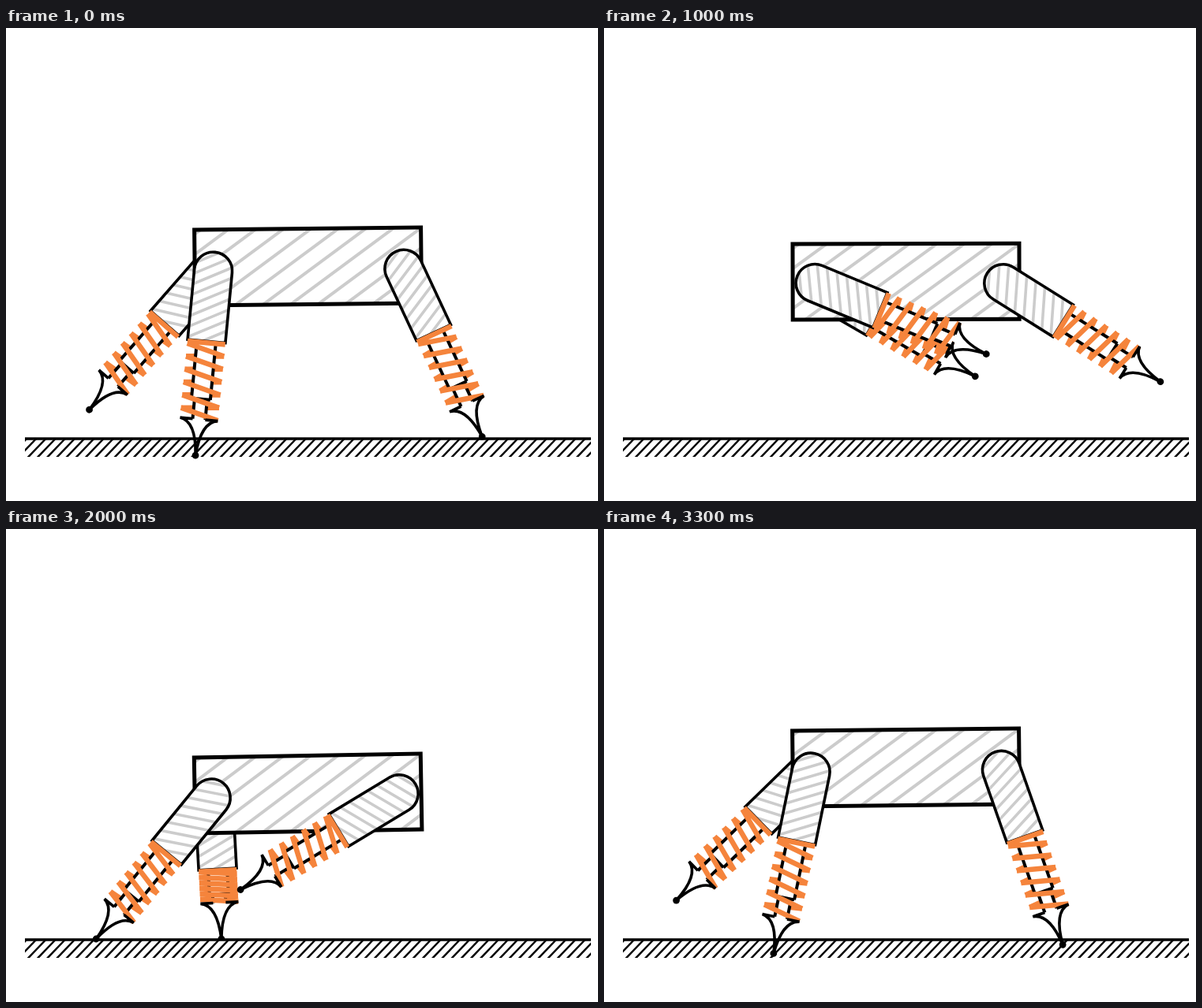
Animation, 750 px wide and 600 px high, one loop 3.35 s. Source, as an HTML page with a canvas:

```html
<!DOCTYPE html>
<html lang="en">
<head>
<meta charset="utf-8">
<title>Running robot with spring legs</title>
<style>
html, body { margin: 0; width: 750px; height: 600px; overflow: hidden; background: #fff; }
canvas { display: block; }
</style>
</head>
<body>
<canvas id="stage" width="750" height="600"></canvas>
<script>
const ctx = document.getElementById('stage').getContext('2d');
const LOOP = 3.35, STEP = 0.05;
const BLACK = '#000', GREY = '#ccc', ORANGE = '#f5843c';
const GROUND = 520, MID_X = 382.6, BODY_W = 287, BODY_H = 96;
const HALF = 24, LEG_END = 94, REACH = 239.5, FOOT = 46;

// Key poses as [seconds, value]; angles in degrees, forward is positive.
const height = [[0, 302.5], [0.6, 309.3], [1.1, 325.5], [1.35, 336.5], [1.66, 343],
  [2, 335.5], [2.2, 327.4], [2.5, 316], [2.75, 309], [2.9, 306.3], [3.3, 302.5]];
const tilt = [[0, 3], [0.6, 1.5], [1.35, 1], [1.66, 3], [2, 5], [2.5, 4], [2.9, 3.5]];
const rear = [[0, -5.5], [0.3, 30], [0.6, 55.9], [1, 67.5], [1.35, 49.9], [1.68, 4],
  [2, -39.2], [2.2, -57.5], [2.5, -66.3], [2.9, -51.5], [3.3, -11.6]];
const farRear = [[0, -41.1], [0.33, -4], [0.6, 28.1], [0.93, 56], [1.35, 67.6], [1.68, 49],
  [2, 3.1], [2.33, -39], [2.5, -55.9], [2.9, -67.4], [3.3, -45.7]];
const front = [[0, 25], [0.3, 53], [0.6, 66.7], [0.8, 67.4], [1.1, 50], [1.35, 22.3],
  [1.68, -24], [2, -58.8], [2.25, -67.3], [2.5, -59.9], [2.9, -27.1], [3.3, 19.3]];

// Smooth periodic curve through the keys.
function curve(keys, time) {
  const t = time % LOOP, n = keys.length;
  const key = i => {
    const turn = Math.floor(i / n), k = keys[i - turn * n];
    return [k[0] + turn * LOOP, k[1]];
  };
  const slope = i => {
    const a = key(i - 1), b = key(i), c = key(i + 1);
    const h1 = b[0] - a[0], h2 = c[0] - b[0];
    return ((b[1] - a[1]) / h1 * h2 + (c[1] - b[1]) / h2 * h1) / (h1 + h2);
  };
  let i = 0;
  while (i < n - 1 && key(i + 1)[0] <= t + 1e-9) i++;
  const a = key(i), b = key(i + 1), h = b[0] - a[0], u = (t - a[0]) / h, v = 1 - u;
  return a[1] * (1 + 2 * u) * v * v + b[1] * (3 - 2 * u) * u * u
    + h * u * v * (slope(i) * v - slope(i + 1) * u);
}

function stroke(color, width) {
  ctx.strokeStyle = color;
  ctx.lineWidth = width;
  ctx.stroke();
}

function lines(color, width, ...segments) {
  ctx.beginPath();
  for (const [x1, y1, x2, y2] of segments) {
    ctx.moveTo(x1, y1);
    ctx.lineTo(x2, y2);
  }
  stroke(color, width);
}

// Hatches the current path, then outlines it.
function hatched(path, hatch, width) {
  ctx.fillStyle = '#fff';
  ctx.fill(path);
  ctx.save();
  ctx.clip(path);
  hatch();
  ctx.restore();
  ctx.strokeStyle = BLACK;
  ctx.lineWidth = width;
  ctx.stroke(path);
}

function drawGround() {
  ctx.fillStyle = '#fff';
  ctx.fillRect(24, 520, 717, 32);
  ctx.save();
  ctx.beginPath();
  ctx.rect(24, 519, 717, 25);
  ctx.clip();
  const marks = [];
  for (let x = 3; x < 750; x += 12.2) marks.push([x, 545, x + 23, 521]);
  lines(BLACK, 2.5, ...marks);
  ctx.restore();
  lines(BLACK, 3.5, [24, 521, 741, 521]);
}

function drawBody(y, drop) {
  ctx.save();
  ctx.translate(MID_X, y);
  ctx.rotate(-drop / BODY_W);
  const box = new Path2D();
  box.rect(-BODY_W / 2, -BODY_H / 2, BODY_W, BODY_H);
  hatched(box, () => {
    const marks = [];
    for (let i = -5; i < 8; i++) {
      const x = -92.6 + i * 35;
      marks.push([x - 14, 58, x + 146, -58]);
    }
    lines(GREY, 4, ...marks);
  }, 5);
  ctx.restore();
}

function drawSpring(len) {
  const s = len - FOOT - LEG_END;
  const at = f => LEG_END + s * f;
  const left = k => at(0.05 + 0.165 * k), right = k => at(0.17 + 0.165 * k);
  const back = [], fore = [[-HALF, LEG_END + 2, HALF, LEG_END + 2]];
  for (let k = 0; k < 6; k++) {
    fore.push([-HALF, left(k), HALF, right(k)]);
    if (k < 5) back.push([HALF, right(k), -HALF, left(k + 1)]);
  }
  const end = at(0.74), cap = at(1);
  lines(ORANGE, 6.5, ...back);
  ctx.fillStyle = '#fff';
  ctx.fillRect(-12, LEG_END, 24, end - LEG_END);
  ctx.fillRect(-8, end, 16, cap - end);
  lines(BLACK, 4, [-12, LEG_END, -12, end], [12, LEG_END, 12, end], [-12, end, 12, end],
    [-8, end, -8, cap], [8, end, 8, cap]);
  lines(ORANGE, 6.5, ...fore);
}

function drawFoot(len) {
  const cap = len - FOOT;
  ctx.beginPath();
  for (const side of [-1, 1]) {
    ctx.moveTo(side * 8, cap);
    ctx.lineTo(side * HALF, cap);
    ctx.quadraticCurveTo(side * 3, cap + 3, 0, len);
  }
  stroke(BLACK, 3.6);
  ctx.beginPath();
  ctx.arc(0, len, 4.4, 0, 7);
  ctx.fillStyle = BLACK;
  ctx.fill();
}

function drawLeg(keys, x, y, t) {
  const deg = curve(keys, t), angle = deg * Math.PI / 180;
  const pushing = curve(keys, t + 0.02) < deg;
  const len = pushing ? Math.min(REACH, (GROUND - y) / Math.cos(angle)) : REACH;
  ctx.save();
  ctx.translate(x, y);
  ctx.rotate(-angle);
  const thigh = new Path2D();
  thigh.moveTo(-HALF, LEG_END);
  thigh.lineTo(-HALF, 4.5);
  thigh.arc(0, 4.5, HALF, Math.PI, 0);
  thigh.lineTo(HALF, LEG_END);
  thigh.closePath();
  hatched(thigh, () => {
    const marks = [];
    for (let m = -30; m < 130; m += 13.5) marks.push([-30, m + 16, 30, m - 16]);
    lines(GREY, 3.6, ...marks);
  }, 3.6);
  drawSpring(len);
  drawFoot(len);
  ctx.restore();
}

function draw(t) {
  const y = curve(height, t), drop = curve(tilt, t);
  const hip = x => y - drop * (x - MID_X) / BODY_W;
  ctx.fillStyle = '#fff';
  ctx.fillRect(0, 0, 750, 600);
  drawLeg(farRear, 263, hip(263), t);
  drawGround();
  drawBody(y, drop);
  drawLeg(rear, 263, hip(263), t);
  drawLeg(front, 502, hip(502), t);
}

function tick() {
  const t = performance.now() / 1000 % LOOP;
  draw(Math.floor(t / STEP + 1e-6) * STEP);
  requestAnimationFrame(tick);
}
tick();
</script>
</body>
</html>
```
